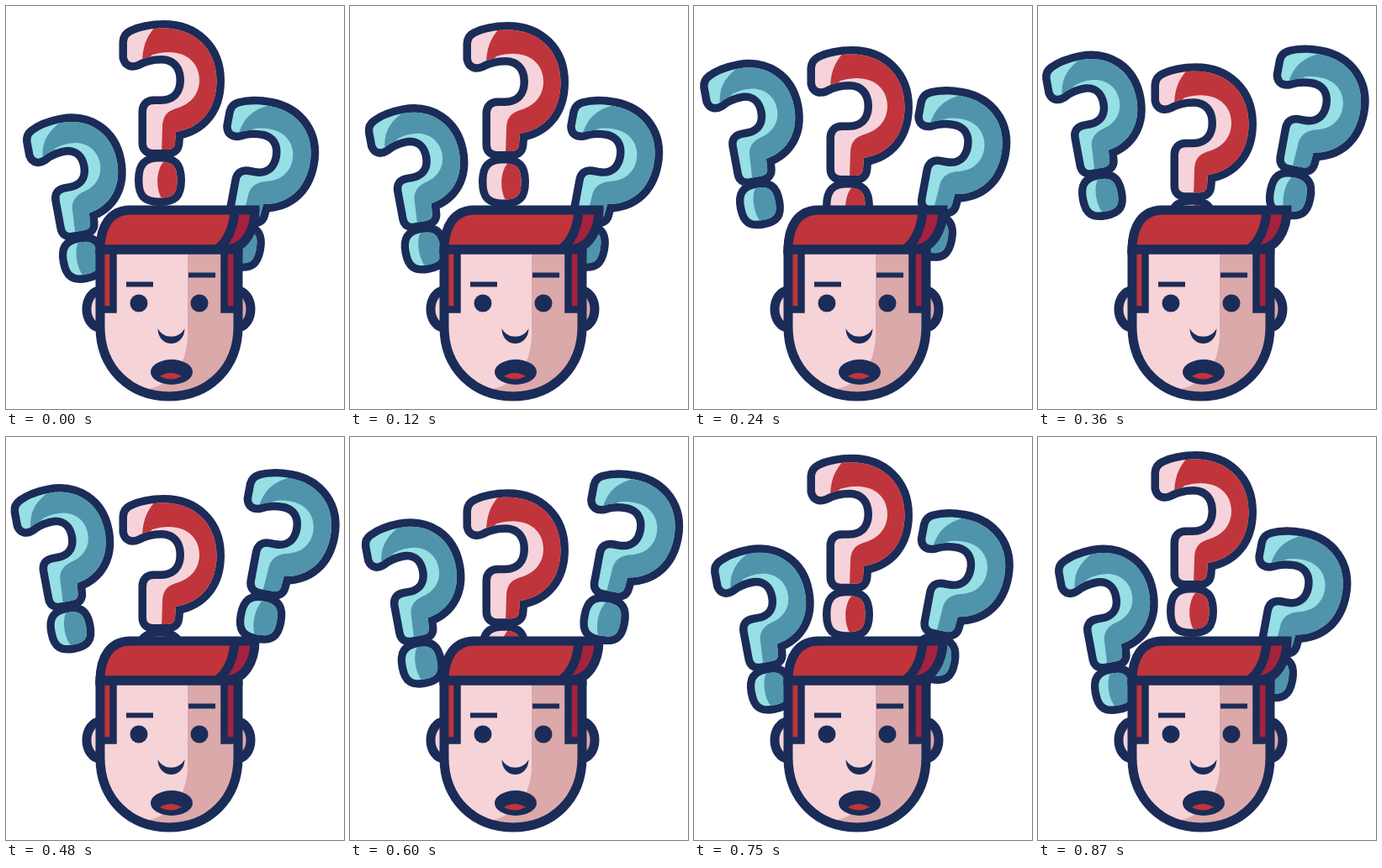
These frames come from a looping animation (402x480 px, 900 ms). An HTML page:

```html
<!DOCTYPE html>
<html lang="en">
<head>
<meta charset="utf-8">
<title>Question marks</title>
<style>
  html, body { margin: 0; width: 100%; height: 100%; overflow: hidden; background: #fff; }
  svg { display: block; width: 402px; height: 480px; }
  .line { stroke: #1b2c58; stroke-width: 11; }
  .thin { stroke: #1b2c58; stroke-width: 8.5; }
  .edge { stroke: #1b2c58; stroke-width: var(--edge); stroke-linejoin: round; }
  .none { fill: none; }
  .ink { fill: #1b2c58; }
  .red { fill: #c0353b; }
  .wine { fill: #a5223f; }
  .skin { fill: #f6d3d7; }
  .shade { fill: #dba9a9; }
</style>
</head>
<body>
<svg viewBox="0 0 402 480" xmlns="http://www.w3.org/2000/svg">
  <defs>
    <path id="hook" d="M150 34 C160 29 172 26.5 188 26.5 C224 26.5 250.5 51 250.5 89
      C250.5 123 232 145 202 150 L201 163 Q200.500 171 192 171 H175 Q167 171 167 163
      V126 Q167 117 176 117 H184 C202 117 212 105 212 88 C212 70 201 59 185 59
      C173 59 163 62 156 66 Q146 70 144 61 V43 Q144.500 36.500 150 34 Z"/>
    <path id="dot" d="M183 185.500 C198.500 185.500 203.500 191 203.500 207.500 S198.500 228.500 183 228.500
      S162.500 224 162.500 207.500 S167.500 185.500 183 185.500 Z"/>
    <clipPath id="inside"><use href="#hook"/><use href="#dot"/></clipPath>
    <g id="body">
      <g class="edge"><use href="#hook"/><use href="#dot"/></g>
      <use href="#hook"/><use href="#dot"/>
    </g>
    <!-- darker side of a mark -->
    <path id="tone" clip-path="url(#inside)" d="M182 20 C168 34 162 46 162 70 L174 58
      C208 48 230 64 230 88 C230 107 217 118 202 122 C190 126 186 133 186 145 L185 175
      H260 V20 Z M190 183 C178 192 177 220 187 232 H206 V183 Z"/>
    <path id="tone-slim" clip-path="url(#inside)" d="M190 24 C170 33 157 45 155 70 L174 58
      C206 48 228 64 228 88 C228 107 215 118 200 121 C186 125 181 133 181 145 L179 175
      H260 V20 Z M183 183 C173 192 172 220 181 232 H206 V183 Z"/>
  </defs>

  <rect width="402" height="480" fill="#fff"/>
  <g id="marks"></g>

  <g id="head">
    <ellipse class="skin line" cx="112" cy="361" rx="16" ry="22"/>
    <ellipse class="shade line" cx="275" cy="361" rx="16" ry="22"/>
    <path class="skin" d="M112 290 V382 C112 432 148 465 194 465 S276 432 276 382 V290 Z"/>
    <path class="shade" d="M216 290 V390 C216 425 200 449 168 457 Q180 465 194 465
      C240 465 276 432 276 382 V290 Z"/>
    <path class="red thin" d="M112.500 290 H127.500 V361.500 H112.500 Z"/>
    <path class="wine thin" d="M259.500 290 H275.500 V361.500 H259.500 Z"/>
    <path class="line none" d="M112 290 V382 C112 432 148 465 194 465 S276 432 276 382 V290"/>

    <path class="red" d="M112 290 C112 262 124 243 148 243 H296 C296 267 284 289 262 290 Z"/>
    <path class="wine" d="M272 243 H296 C296 267 284 289 262 290 H250 C262 283 271 265 272 243 Z"/>
    <path class="line none" d="M272 243 C271 265 262 283 250 290"/>
    <path class="line none" d="M112 290 C112 262 124 243 148 243 H296 C296 267 284 289 262 290 Z"/>
    <path class="line" d="M106.500 290 H281.500"/>

    <g class="ink">
      <rect x="143" y="328.500" width="32" height="6"/>
      <rect x="217" y="317.500" width="32" height="6"/>
      <circle cx="158" cy="354" r="10.500"/>
      <circle cx="230" cy="354" r="10.500"/>
      <path d="M180.500 384 C181 408 212 408 212.500 384 C206 397 187 397 180.500 384 Z"/>
      <ellipse cx="197" cy="436" rx="25" ry="15"/>
    </g>
    <path class="red" d="M183 441 Q196 433 209 441 Q196 448 183 441 Z"/>
  </g>
</svg>
<script>
const LOOP = 900, MOVE = 450, EDGE = 19;
const blue = { light: '#96dfe5', dark: '#5094ac', tone: 'tone-slim' };
const red = { light: '#f6d3da', dark: '#c0353b', tone: 'tone' };

// x, y: dot at rest; dx, dy: travel; out, back: middle of each move in ms
const marks = [
  { x: 91.5, y: 301.5, dx: -15, dy: -75, turn: -10.5, size: .905, out: 178, back: 590, look: blue },
  { x: 278.5, y: 286.5, dx: 24.5, dy: -70, turn: 10.5, size: .942, out: 293, back: 725, look: blue },
  { x: 183, y: 208, dx: 0, dy: 52, turn: 0, size: 1, out: 228, back: 664, look: red }
];

const layer = document.getElementById('marks');
for (const m of marks) {
  const { light, dark, tone } = m.look;
  m.node = document.createElementNS('http://www.w3.org/2000/svg', 'g');
  // keep the outline equally thick at every size
  m.node.style.setProperty('--edge', `${EDGE / m.size}px`);
  m.node.innerHTML = `<use href="#body" fill="${light}"/><use href="#${tone}" fill="${dark}"/>`;
  layer.append(m.node);
}

function ease(p) {
  p = Math.min(1, Math.max(0, p));
  return p < .5 ? 8 * p ** 4 : 1 - 8 * (1 - p) ** 4;
}

const step = (t, mid) => ease((t - mid) / MOVE + .5);

// moves may run across the loop seam, so the neighbouring loops count too
function travel(t, m) {
  return [-LOOP, 0, LOOP].reduce((k, s) => k + step(t, m.out + s) - step(t, m.back + s), 0);
}

function draw(t) {
  for (const m of marks) {
    const k = travel(t, m);
    m.node.setAttribute('transform',
      `translate(${m.x + m.dx * k} ${m.y + m.dy * k}) rotate(${m.turn}) scale(${m.size}) translate(-183 -208)`);
  }
}

const start = performance.now();
function tick() {
  const t = (performance.now() - start) % LOOP;
  draw(Math.floor(t / 30) * 30);
  requestAnimationFrame(tick);
}
draw(0);
requestAnimationFrame(tick);
</script>
</body>
</html>
```
